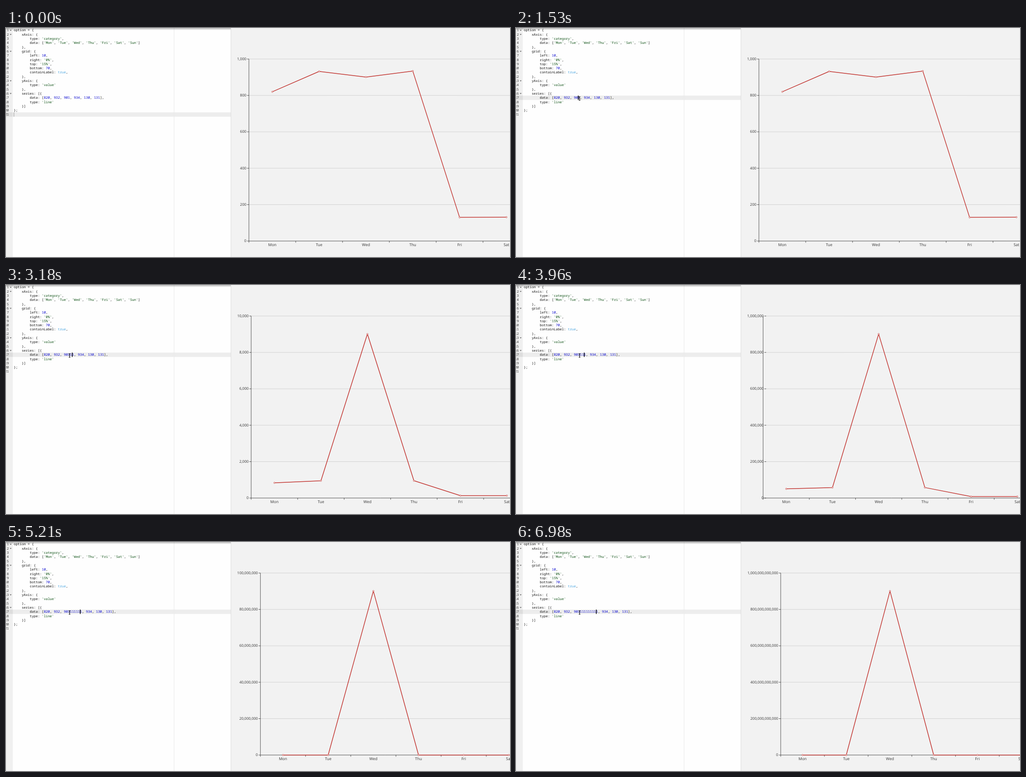
These frames come from a looping animation (1108 px wide and 505 px high, 8 s). An HTML page with a canvas:

```html
<!DOCTYPE html>
<html lang="en">
<head>
<meta charset="utf-8">
<style>
html, body { margin: 0; width: 100%; height: 100%; overflow: hidden; background: #f2f2f2; }
canvas { display: block; }
</style>
</head>
<body>
<canvas id="stage" width="1108" height="505"></canvas>
<script>
const ctx = document.getElementById('stage').getContext('2d');
const LOOP = 8000, STEP = 78;
const ROW = 9.3, COL = 4.41, CODE_X = 17;
const TOP = 68.4, BOTTOM = 469.8, RIGHT = 1254.5;
const HAIRLINE = 0.85;
const DAYS = ['Mon', 'Tue', 'Wed', 'Thu', 'Fri', 'Sat', 'Sun'];
const FOLDS = [1, 2, 6, 13, 16];

// Moments at which one more digit is typed into the third value
const KEYS = [2460, 3010, 3410, 4030, 4350, 4890, 5350, 5810, 6210];

// Chart states: first visible time, time already elapsed in its tween, axis x, axis maximum, third value
const CHARTS = [
  { at: -1000, lead: 0, left: 534, max: 1e3, peak: 901 },
  { at: 2940, lead: 27, left: 539, max: 1e4, peak: 9011 },
  { at: 3960, lead: 45, left: 550, max: 1e6, peak: 901111 },
  { at: 4890, lead: 30, left: 559.3, max: 1e8, peak: 90111111 },
  { at: 6670, lead: 30, left: 582, max: 1e12, peak: 901111111111 }
];

const codeLines = value => `option = {
    xAxis: {
        type: 'category',
        data: ['Mon', 'Tue', 'Wed', 'Thu', 'Fri', 'Sat', 'Sun']
    },
    grid: {
        left: 10,
        right: '0%',
        top: '15%',
        bottom: 70,
        containLabel: true,
    },
    yAxis: {
        type: 'value'
    },
    series: [{
        data: [820, 932, ${value}, 934, 130, 131],
        type: 'line'
    }]
};
`.split('\n');

const lerp = (a, b, p) => a + (b - a) * p;

function rect(x, y, w, h, color) {
  ctx.fillStyle = color;
  ctx.fillRect(x, y, w, h);
}

function path(points, color, width = HAIRLINE) {
  ctx.beginPath();
  points.forEach(([x, y]) => ctx.lineTo(x, y));
  ctx.strokeStyle = color;
  ctx.lineWidth = width;
  ctx.stroke();
}

function label(text, x, y, color, align = 'left') {
  ctx.fillStyle = color;
  ctx.textAlign = align;
  ctx.fillText(text, x, y);
}

function tokenColor(token) {
  if (token[0] === "'") return '#0b4f12';
  if (token === 'true') return '#4aa5e0';
  return /^\d/.test(token) ? '#0000cd' : '#111';
}

function drawEditor(t) {
  const typed = KEYS.filter(k => t >= k).length;
  const clicked = t >= 1300;
  const active = clicked ? 16 : 20;
  const activeY = Math.round(0.4 + active * ROW);

  rect(0, 0, 494, 505, '#fefefe');
  rect(0, 0, 15, 505, '#f0f0f0');
  rect(0, activeY, 15, 9.6, '#dedede');
  rect(15, activeY, 479, 9.6, '#ededed');
  rect(369, 0, 1, 505, '#e9e9e9');

  ctx.font = '7.35px "Noto Sans Mono", monospace';
  codeLines('901' + '1'.repeat(typed)).forEach((line, i) => {
    const y = 7.4 + i * ROW;
    label(i + 1, 6.2, y, '#333', 'right');
    let col = 0;
    for (const token of line.split(/('[^']*'|\d+|true)/)) {
      if (token.trim()) label(token, CODE_X + col * COL, y, tokenColor(token));
      col += token.length;
    }
  });

  ctx.fillStyle = '#666';
  for (const n of FOLDS) {
    const y = 4 + (n - 1) * ROW;
    ctx.beginPath();
    ctx.moveTo(8.3, y);
    ctx.lineTo(12.3, y);
    ctx.lineTo(10.3, y + 2.4);
    ctx.fill();
  }

  const caretOn = t < 2080 || t >= 2460;
  const caretX = clicked ? CODE_X + (27 + typed) * COL : CODE_X;
  if (caretOn) rect(caretX, activeY, clicked ? 1.5 : 1, 9.6, clicked ? '#000' : '#a0a0a0');

  const shadow = ctx.createLinearGradient(0, 0, 0, 5);
  shadow.addColorStop(0, 'rgba(0,0,0,.28)');
  shadow.addColorStop(1, 'rgba(0,0,0,0)');
  rect(0, 0, 494, 5, shadow);
  rect(494, 0, 1, 505, '#dcdcdc');
}

function pointHeights({ max, peak }) {
  return [820, 932, peak, 934, 130, 131].map(v => lerp(BOTTOM, TOP, v / max));
}

function drawChart(t) {
  const index = CHARTS.findLastIndex(c => t >= c.at);
  const now = CHARTS[index], before = CHARTS[Math.max(0, index - 1)];
  const elapsed = now.lead + STEP * Math.floor((t - now.at) / STEP);
  const p = 1 - (1 - Math.min(1, elapsed / 300)) ** 3;
  const left = lerp(before.left, now.left, p);
  const band = (RIGHT - left) / 7;
  const oldY = pointHeights(before), newY = pointHeights(now);
  const points = newY.map((y, i) => [left + (i + 0.5) * band, lerp(oldY[i], y, p)]);

  // Labels, ticks and grid lines jump to the new layout; the axes glide
  ctx.font = '8.05px "Open Sans", "Noto Sans", sans-serif';
  for (let i = 0; i <= 5; i++) {
    const y = lerp(BOTTOM, TOP, i / 5);
    if (i) path([[now.left, y], [1108, y]], '#ccc');
    path([[now.left - 4, y], [now.left, y]], '#333');
    label((now.max * i / 5).toLocaleString('en-US'), now.left - 5.6, y + 2.3, '#333', 'right');
  }

  path([[left, TOP], [left, BOTTOM]], '#333');
  path([[left, BOTTOM], [1108, BOTTOM]], '#333');
  ctx.font = '8.5px "Open Sans", "Noto Sans", sans-serif';
  DAYS.forEach((day, i) => {
    const x = left + i * band;
    path([[x, BOTTOM], [x, BOTTOM + 3.6]], '#333');
    label(day, x + band / 2, 481, '#333', 'center');
  });

  ctx.lineJoin = 'bevel';
  path(points, '#c23531', 1.5);
  for (const [x, y] of points) {
    ctx.beginPath();
    ctx.arc(x, y, 1.5, 0, Math.PI * 2);
    ctx.fillStyle = '#fff';
    ctx.fill();
    ctx.lineWidth = 0.8;
    ctx.stroke();
  }
}

function drawPointer(t) {
  if (t < 440) return;
  const p = Math.min(1, Math.floor((t - 440) / 76.6) / 9);
  const eased = 1 - (1 - p) ** 2;
  const x = lerp(854, 139, eased), y = lerp(447, 152, eased);
  if (x < 494) {
    path([[x - 1, y - 0.5], [x + 2.5, y - 0.5]], '#111', 1);
    path([[x - 1, y + 7.5], [x + 2.5, y + 7.5]], '#111', 1);
    path([[x + 0.8, y - 0.5], [x + 0.8, y + 7.5]], '#111', 1.2);
    return;
  }
  ctx.beginPath();
  for (const [dx, dy] of [[0, 0], [0, 10], [2.3, 7.8], [4, 11], [5.4, 10.3], [4, 7.2], [7, 7]]) {
    ctx.lineTo(x + dx, y + dy);
  }
  ctx.closePath();
  ctx.fillStyle = '#fff';
  ctx.fill();
  ctx.strokeStyle = '#000';
  ctx.lineWidth = 0.7;
  ctx.stroke();
}

function frame() {
  const t = performance.now() % LOOP;
  ctx.textRendering = 'geometricPrecision';
  rect(0, 0, 1108, 505, '#f2f2f2');
  drawChart(t);
  drawEditor(t);
  drawPointer(t);
  requestAnimationFrame(frame);
}
frame();
</script>
</body>
</html>
```
